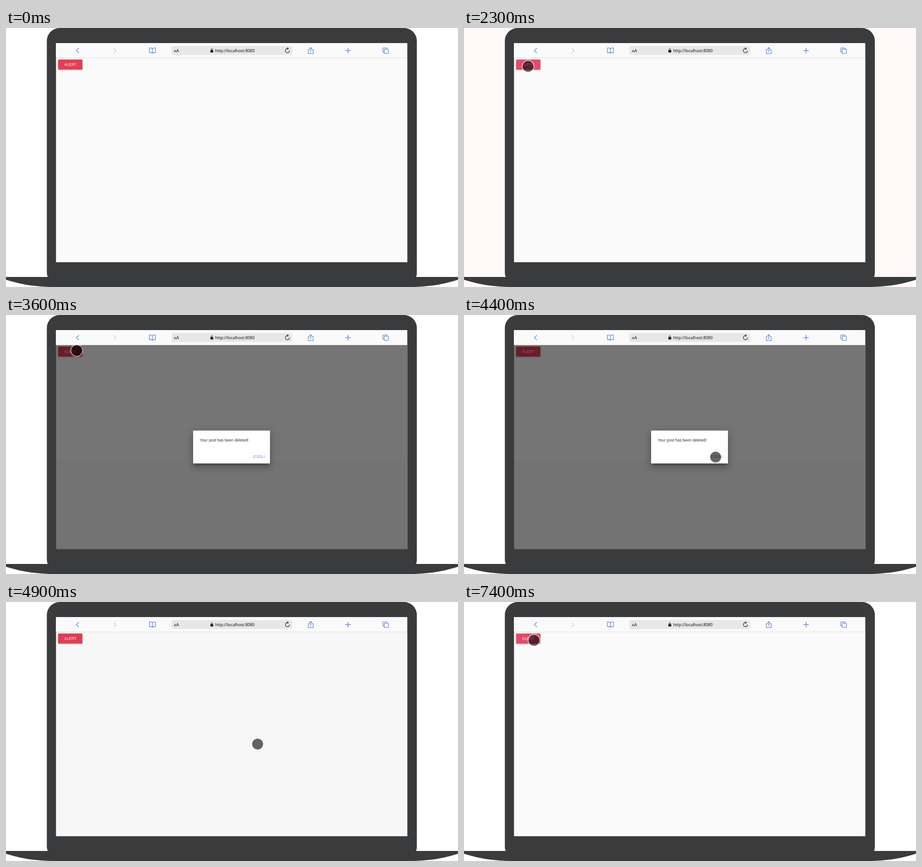
Animation, 988 px wide and 567 px high, one loop 8 s. Source, as an HTML page:

```html
<!DOCTYPE html>
<html lang="en">
<head>
<meta charset="utf-8">
<title>Alert dialog on a laptop</title>
<style>
  html, body { margin: 0; width: 100%; height: 100%; overflow: hidden; background: #fff; }
  svg { display: block; width: 988px; height: 567px; }
  .case { fill: #3a3b3d; }
  .icon { fill: none; stroke: #6188d8; stroke-width: 1.3; stroke-linecap: round; stroke-linejoin: round; }
  .bar-text { font-family: "Noto Sans", sans-serif; fill: #111; }
  .app-text { font-family: "Liberation Sans", Arial, sans-serif; }
  .wide { filter: blur(7.2px); }
  .soft { filter: blur(9px); }
  .near { filter: blur(3px); }

  /* 1% = 80 ms; the script advances all tracks in 100 ms ticks */
  .track { animation: 8s linear infinite paused; }
  #room { animation-name: room; }
  #hover { animation-name: hover; }
  #dim { animation-name: dim; }
  #dialog { animation-name: dialog; transform-origin: 493px 289px; }
  #pointer { animation-name: move; }
  #dot { animation-name: show; }

  @keyframes room {
    0%, 27.4% { opacity: 0; }
    27.5%, 37.4% { opacity: 1; }
    37.5%, 100% { opacity: 0; }
  }
  @keyframes hover {
    0%, 27.4% { opacity: 0; }
    27.5%, 42.4% { opacity: 1; }
    42.5%, 81% { opacity: 0; }
    81.25%, 84.9% { opacity: .3; }
    85%, 100% { opacity: 1; }
  }
  @keyframes dim {
    0%, 41.25% { opacity: 0; }
    45%, 57.5% { opacity: .536; }
    58.75% { opacity: .47; }
    60% { opacity: .18; }
    61.25% { opacity: .012; }
    62.5%, 100% { opacity: 0; }
  }
  @keyframes dialog {
    0%, 41.25% { opacity: 0; transform: scale(.9); }
    45%, 56.25% { opacity: 1; transform: none; }
    57.5% { opacity: .6; transform: scale(.965); }
    58.75% { opacity: .09; transform: scale(.917); }
    60%, 100% { opacity: 0; transform: scale(.9); }
  }
  @keyframes move {
    0%, 13.75% { transform: translate(520px, 400px); }
    20%, 21.25% { transform: translate(300px, 210px); animation-timing-function: ease-out; }
    28.75%, 35% { transform: translate(140px, 84px); }
    37.5%, 45% { transform: translate(154.6px, 77.6px); animation-timing-function: ease-in-out; }
    52.5%, 63.75% { transform: translate(550px, 311px); animation-timing-function: ease-in-out; }
    71.25%, 72.5% { transform: translate(400px, 225px); animation-timing-function: ease-out; }
    81.25% { transform: translate(158px, 87px); }
    83.75% { transform: translate(148px, 82px); }
    92.5%, 100% { transform: translate(153px, 84px); }
  }
  @keyframes show {
    0%, 13.75% { opacity: 0; }
    16.25%, 100% { opacity: 1; }
  }
</style>
</head>
<body>
<svg viewBox="0 0 988 567" xmlns="http://www.w3.org/2000/svg">
  <defs>
    <filter id="lift" x="-20%" y="-30%" width="140%" height="190%">
      <feDropShadow dx="0" dy="1" stdDeviation="1" flood-opacity=".4"/>
    </filter>
    <clipPath id="screen"><rect x="109.3" y="33.3" width="768.7" height="479.4"/></clipPath>
  </defs>

  <rect width="988" height="567" fill="#fff"/>
  <rect id="room" class="track" width="988" height="567" fill="#fff9f8"/>

  <path class="case" d="M89.3 28A28 28 0 0 1 117.3 0H870A28 28 0 0 1 898 28V534Q898 542 896 546H92Q89.3 542 89.3 534Z"/>
  <path class="case" d="M0 545H988V551C960 560 928 567 880 567H108C60 567 28 560 0 551Z"/>

  <g clip-path="url(#screen)">
    <rect x="109" y="33" width="768.2" height="480" fill="#fafafa"/>

    <g filter="url(#lift)"><rect x="114" y="69" width="53" height="21.7" rx="1.5" fill="#e63e53"/></g>
    <rect id="hover" class="track" x="114" y="69" width="53" height="21.7" rx="1.5" fill="#e8496a"/>
    <text class="app-text" x="140.5" y="82.6" font-size="8.3" text-anchor="middle" fill="#fff" fill-opacity=".92">ALERT</text>

    <path d="M877.5 66V513" stroke="#747474"/>
    <rect id="dim" class="track" x="109" y="65.5" width="768.2" height="448"/>

    <rect x="109" y="33" width="768" height="32.5" fill="#fafafa"/>
    <path d="M109 65.5H877" stroke="#e3e3e3"/>

    <g id="dialog" class="track">
      <rect class="wide" x="407.8" y="261.4" width="170.4" height="74.4" fill-opacity=".14"/>
      <rect class="soft" x="406" y="253.6" width="174" height="78" fill-opacity=".12"/>
      <rect class="near" x="412" y="260.8" width="162" height="66" fill-opacity=".4"/>
      <rect x="409" y="253" width="168" height="72" rx="1" fill="#fff"/>
      <text class="app-text" x="423.4" y="276.6" font-size="8.6" fill="#333">Your post has been deleted!</text>
      <text class="app-text" x="566" y="312.6" font-size="8.4" text-anchor="end" fill="#7088c8">COOL!</text>
    </g>
  </g>

  <g class="icon">
    <path d="M159 44.5L153.7 49.5L159 54.5"/>
    <path d="M235.5 44.5L240.7 49.5L235.5 54.5" stroke="#ccc"/>
    <path d="M320 46Q319 43.6 316 43.6H313.5V54H317Q319.5 54 320 55.5Q320.5 54 323 54H326.6V43.6H324Q321 43.6 320 46V55.5"/>
    <path d="M663.5 47.3H660.7V56.2H671.5V47.3H668.7M666.1 52.5V42.8M663.5 45.2L666.1 42.6L668.7 45.2"/>
    <path d="M742.2 49.5H753.2M747.7 44V55" stroke-width="1.5"/>
    <path d="M826.5 53H825Q823.6 53 823.6 51.6V45Q823.6 43.6 825 43.6H831.6Q833 43.6 833 45V46.3"/>
    <rect x="826.6" y="46.4" width="9.4" height="9.2" rx="1.3"/>
  </g>

  <rect x="361.5" y="39.5" width="264" height="19.5" rx="4.5" fill="#e7e7e7"/>
  <text class="bar-text" x="367" y="52.8" font-size="7.7">A</text>
  <text class="bar-text" x="372" y="52.8" font-size="9.6">A</text>
  <rect x="446.8" y="48.5" width="6.2" height="5" rx=".8" fill="#111"/>
  <path d="M448.2 49V47.3Q448.2 45.4 449.9 45.4Q451.6 45.4 451.6 47.3V49" fill="none" stroke="#111"/>
  <text class="bar-text" x="457" y="52.6" font-size="8.88">http://localhost:8080</text>
  <path d="M616.5 45.1A4.6 4.6 0 1 0 619.8 49.6M614.6 42.6L617.2 45.2L614.6 47.6" fill="none" stroke="#222" stroke-width="1.2"/>

  <g id="pointer" class="track">
    <g id="dot" class="track">
      <circle r="12.1" fill-opacity=".6"/>
      <circle r="12.9" fill="none" stroke="#fff" stroke-opacity=".65" stroke-width="1.7"/>
    </g>
  </g>
</svg>
<script>
  const LOOP = 8000, TICK = 100;
  const tracks = document.getAnimations();
  const start = performance.now();

  function draw() {
    const elapsed = (performance.now() - start) % LOOP;
    const time = Math.floor(elapsed / TICK) * TICK;
    for (const track of tracks) track.currentTime = time;
    requestAnimationFrame(draw);
  }
  draw();
</script>
</body>
</html>
```
